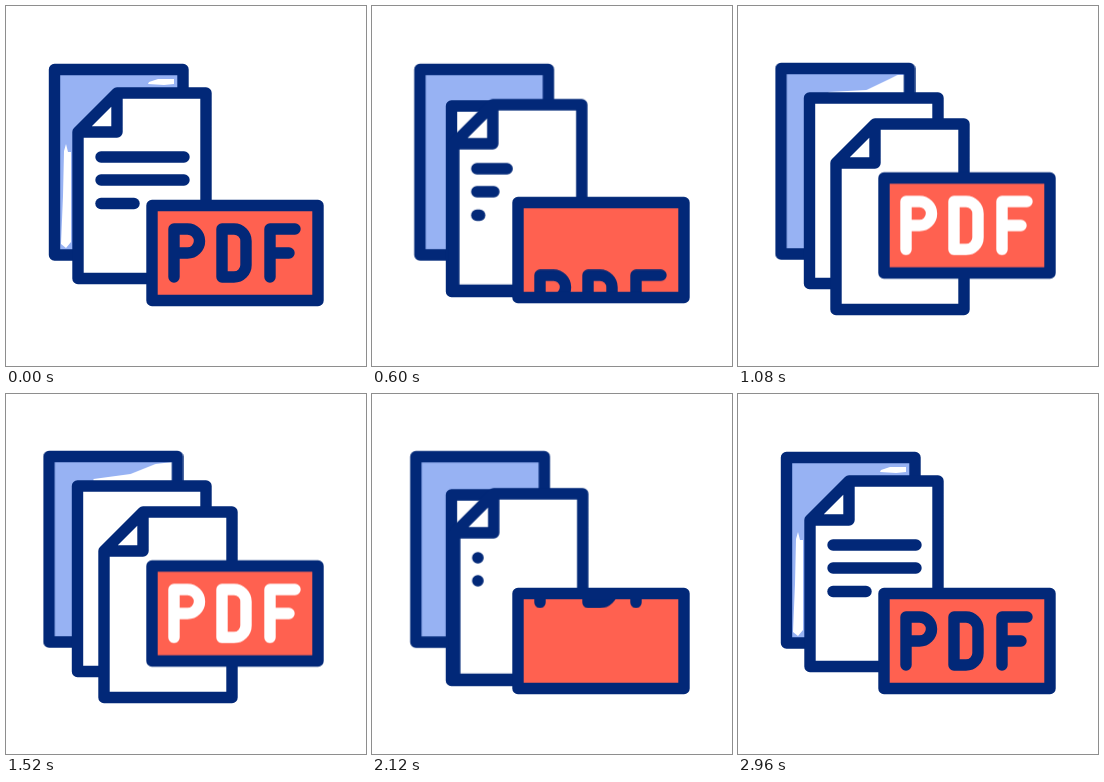
Recreate the animation shown at these times as an HTML page without scripts. Size 360 px wide and 360 px high, loop 3000 ms.

```html
<!DOCTYPE html>
<html lang="en">
<head>
<meta charset="utf-8">
<title>PDF pages</title>
<style>
  html, body { margin: 0; width: 100%; height: 100%; overflow: hidden; background: #fff; }
  svg { display: block; width: 100vw; height: 100vh; }

  .ink { stroke: #022878; stroke-width: 11.4; stroke-linecap: round; stroke-linejoin: round; fill: none; }
  .paper { fill: #fff; }
  .blue { fill: #97b2f3; }
  .red { fill: #ff6150; }
  .light { stroke: #fff; }

  .move { animation: 3s cubic-bezier(.65, 0, .35, 1) infinite; }
  .show { animation: 3s step-end infinite; }

  /* pages */
  .back { animation-name: back; }
  .mid { animation-name: mid; }
  .front { animation-name: front; }
  @keyframes back {
    0%, 13.33%, 81.33%, 100% { transform: none; }
    36%, 65.33% { transform: translate(-5.5px, -1px); }
  }
  @keyframes mid {
    0%, 20% { transform: translate(8px, 13px); }
    36%, 61.33% { transform: translate(0, 5px); }
    72%, 100% { transform: translate(8px, 14px); }
  }
  @keyframes front {
    0%, 6.67%, 81.33%, 100% { transform: none; }
    36%, 58.67% { transform: translate(26px, 31px); }
  }

  /* label and its lettering */
  .label { animation-name: label; }
  .dark { animation-name: dark; }
  .pale { animation-name: pale; }
  @keyframes label {
    0%, 13.33%, 69.33%, 100% { transform: none; }
    36%, 52% { transform: translateY(-27.5px); }
  }
  @keyframes dark {
    0%, 12% { transform: none; }
    27% { transform: translateY(82px); }
    27.01%, 63.33% { transform: translateY(-80px); }
    82.67%, 100% { transform: none; }
  }
  @keyframes pale {
    0%, 16.67% { transform: translateY(-80px); }
    35.33%, 53.33% { transform: none; }
    70%, 100% { transform: translateY(82px); }
  }

  /* text lines shrink to dots and grow again, one after another */
  .row { stroke-dasharray: var(--len) 200; }
  .r1 { --len: 83; animation-name: row1; }
  .r2 { --len: 83; animation-name: row2; }
  .r3 { --len: 33; animation-name: row3; }
  @keyframes row1 {
    0%, 6.67%, 92%, 100% { stroke-dasharray: var(--len) 200; }
    31%, 69.33% { stroke-dasharray: .01 200; }
  }
  @keyframes row2 {
    0%, 6.67%, 93.5%, 100% { stroke-dasharray: var(--len) 200; }
    28%, 69.33% { stroke-dasharray: .01 200; }
  }
  @keyframes row3 {
    0%, 6.67%, 94%, 100% { stroke-dasharray: var(--len) 200; }
    25%, 72% { stroke-dasharray: .01 200; }
  }
  .rows { animation-name: rows; }
  .late { animation-name: late; }
  @keyframes rows { 0%, 69.33% { opacity: 1; } 30% { opacity: 0; } }
  @keyframes late { 0%, 72% { opacity: 1; } 30% { opacity: 0; } }

  /* middle page and bright patches on the blue page */
  .midshow { animation-name: midshow; }
  .rest { animation-name: rest; }
  .edge { animation-name: edge; }
  .sweep { animation-name: sweep; }
  @keyframes midshow { 0%, 71.6% { opacity: 0; } 20% { opacity: 1; } }
  @keyframes rest { 0%, 82% { opacity: 1; } 15% { opacity: 0; } }
  @keyframes edge { 0%, 37% { opacity: 0; } 25% { opacity: 1; } }
  @keyframes sweep { 0%, 62% { opacity: 0; } 37% { opacity: 1; } }
</style>
</head>
<body>
<svg viewBox="0 0 360 360" role="img" aria-label="PDF">
  <defs>
    <clipPath id="inside"><rect x="151" y="204" width="156" height="86"/></clipPath>
    <path id="word" d="M168 271V223H181.5a12 12 0 0 1 0 24H168
      M216 223H228a12 12 0 0 1 12 12V259a12 12 0 0 1-12 12H216Z
      M264 271V223H289M264 247H283"/>
    <rect id="sheet" x="48.5" y="63.5" width="128.5" height="185.5"/>
    <rect id="tag" x="146" y="199.5" width="166" height="95"/>
  </defs>

  <g class="move back">
    <use href="#sheet" class="blue"/>
    <g class="paper">
      <path class="show rest" d="M143 76L152 73H168V78L158 79L142 78ZM60 138L62 146H65V236L60 242L55 238L57 190L58 145Z"/>
      <path class="show edge" d="M96 87L134 85L157 74L165 70H172V92H139L134 89L96 90Z"/>
      <path class="show sweep" d="M93 86L130 81L155 71L172 69V92H93Z"/>
    </g>
    <use href="#sheet" class="ink"/>
  </g>

  <g class="show midshow">
    <g class="move mid">
      <rect class="paper" x="71.5" y="87" width="128.5" height="185.5"/>
      <rect class="ink" x="71.5" y="87" width="128.5" height="185.5"/>
    </g>
  </g>

  <g class="move front">
    <path class="paper" d="M72 126L111 87H200V272.5H72Z"/>
    <g class="ink">
      <path d="M72 126L111 87H200V272.5H72ZM111 87V126H72"/>
      <g class="show rows">
        <path class="move row r1" d="M95 151H178"/>
        <path class="move row r2" d="M95 174H178"/>
      </g>
      <g class="show late">
        <path class="move row r3" d="M95 197.5H128"/>
      </g>
    </g>
  </g>

  <g class="move label">
    <use href="#tag" class="red"/>
    <g clip-path="url(#inside)">
      <g class="move dark"><use href="#word" class="ink"/></g>
      <g class="move pale"><use href="#word" class="ink light"/></g>
    </g>
    <use href="#tag" class="ink"/>
  </g>
</svg>
</body>
</html>
```
